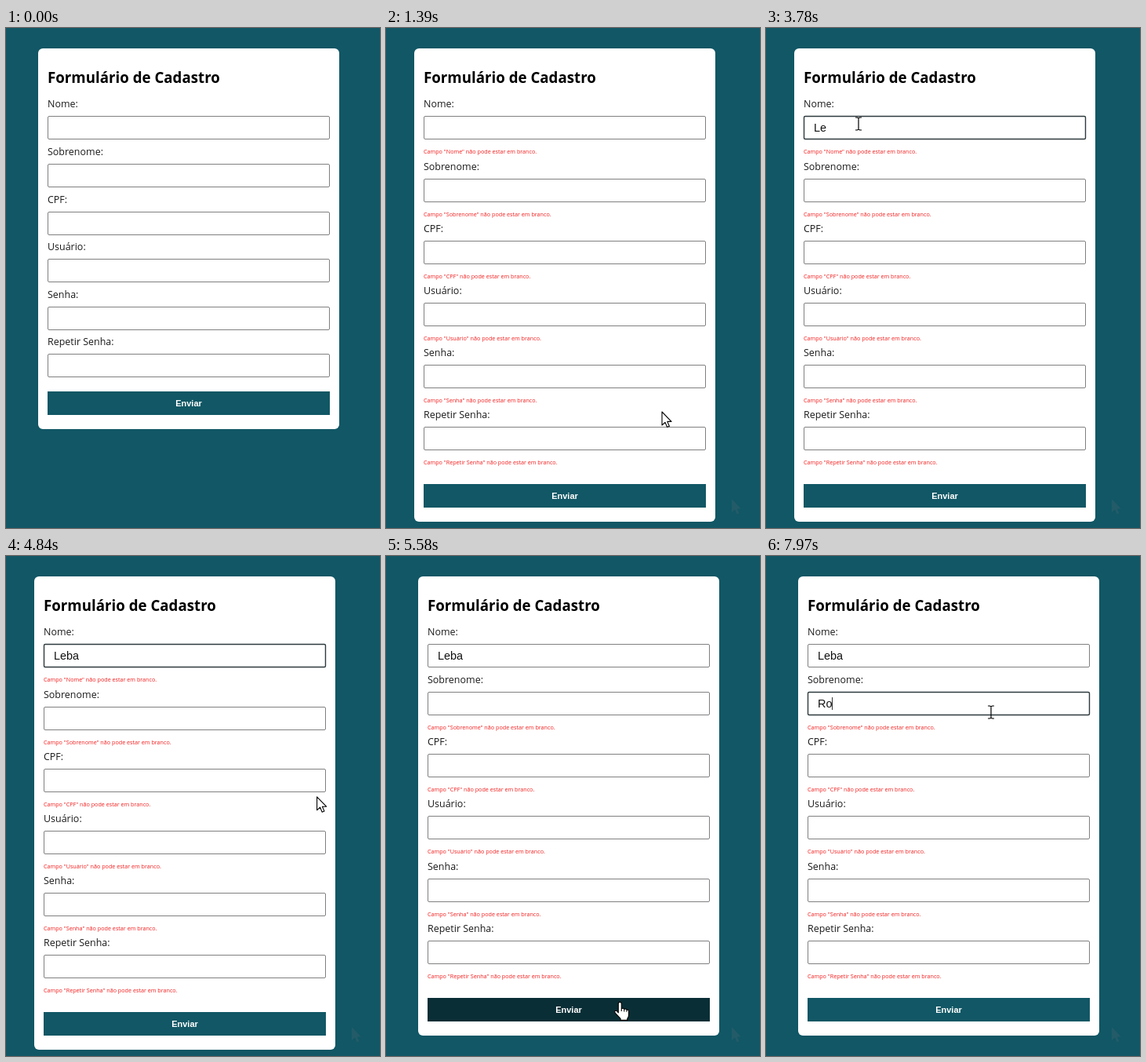
An HTML page for the animation above (8000 ms loop, 477 by 637 pixels).

```html
<!DOCTYPE html>
<html lang="pt-BR">
<head>
<meta charset="utf-8">
<title>Formulário de Cadastro</title>
<style>
  html, body { margin: 0; width: 100%; height: 100%; overflow: hidden; background: #115765; }
  svg { display: block; width: 477px; height: 637px; }
  text { font-family: "Open Sans", "Noto Sans", sans-serif; }
  .title { font-size: 18.72px; font-weight: 700; }
  .label { font-size: 12.48px; fill: #1a1a1a; }
  .error { font-size: 7.2px; fill: #f41c1c; }
  .value { font: 14.4px "Liberation Sans", Arial, sans-serif; fill: #111; }
  .send { font: bold 11px "Liberation Sans", Arial, sans-serif; fill: #fff; text-anchor: middle; }
  .field { fill: #fff; stroke: #808080; }
  .field.focus { stroke: #2e3a3e; stroke-width: 1.4; }
</style>
</head>
<body>
<svg id="stage" viewBox="0 0 477 637"></svg>
<script>
const LOOP = 8000, BLINK = 530;
const TEAL = '#115765', TEAL_DARK = '#0a2e36';
const LABELS = ['Nome', 'Sobrenome', 'CPF', 'Usuário', 'Senha', 'Repetir Senha'];
const ERRORS_AT = 1390, RECHECK_AT = 5440;

// Key times per field: focus first, then one per letter; `blur` ends the focus.
const TYPING = [
  { text: 'Leba', keys: [2120, 2920, 3250, 3910, 4180], blur: 5180 },
  { text: 'Ro', keys: [6780, 7700, 7970], blur: LOOP },
];

// Pointer moves along quadratic curves: from, control, to.
const MOVES = [
  { at: 600, end: 1060, steps: 8, path: [[445, 603], [405, 545], [352, 489]] },
  { at: 1720, end: 2120, steps: 7, path: [[352, 489], [220, 320], [118, 122]] },
  { at: 4580, end: 5180, steps: 10, path: [[118, 122], [680, 400], [297, 590]] },
  { at: 5580, end: 5980, steps: 7, path: [[297, 590], [310, 390], [287, 199]] },
];
const PRESSES = [[1260, 1390], [2120, 2250], [5180, 5310], [6780, 6840]];

const ARROW = 'M0 0V17L4 13.4L6.6 19.5L9.4 18.3L6.8 12.4H12Z';
const HAND = 'M-2 14V2.5a2 2 0 0 1 4 0V9q2-1.5 3.5.5q2-1 3.2.8q2.6-.6 2.6 2v4q0 3-1.8 5.2v2H.8v-2L-5.8 14.5' +
  'q-2-3 .6-3.2q1.6 0 3.2 2.7zM2 9v3M5.5 9.5v3M8.7 10.3v2.5';
const BEAM = 'M-4-8H-1.5L0-7L1.5-8H4M0-7V7M-4 8H-1.5L0 7L1.5 8H4';

const stage = document.getElementById('stage');
const measure = document.createElement('canvas').getContext('2d');
measure.font = '14.4px "Liberation Sans", Arial, sans-serif';

const text = (kind, x, y, content) => `<text class="${kind}" x="${x}" y="${y}">${content}</text>`;
const box = (x, y, w, h, attrs) => `<rect x="${x}" y="${y}" width="${w}" height="${h}" ${attrs}/>`;

function pointerAt(time) {
  const move = MOVES.filter(m => time >= m.at).pop();
  if (!move) return null;
  const step = Math.floor((time - move.at) / (move.end - move.at) * (move.steps - 1) + 1e-6);
  const p = Math.min(1, (step + 1) / move.steps);
  const e = p * p * (3 - 2 * p);
  const [a, b, c] = move.path;
  const [x, y] = [0, 1].map(i => (1 - e) ** 2 * a[i] + 2 * e * (1 - e) * b[i] + e * e * c[i]);
  return { x, y };
}

function layoutAt(time) {
  const hasError = i => time >= ERRORS_AT && (i > 0 || time < RECHECK_AT);
  const rows = [];
  let y = 112.3;
  LABELS.forEach((label, i) => {
    rows.push({ label, y, error: hasError(i) });
    y += hasError(i) ? 79.2 : 60.6;
  });
  const left = time >= ERRORS_AT && time < RECHECK_AT ? 48 : 53;
  return { rows, left, buttonY: Math.round(y - 12.6 + (time >= ERRORS_AT ? 6.3 : 0)) };
}

function typedValue({ text: full, keys, blur }, left, y, time) {
  const past = keys.filter(k => time >= k);
  if (!past.length) return '';
  const value = full.slice(0, past.length - 1);
  const blinkOn = Math.floor((time - past[past.length - 1]) / BLINK) % 2 === 0;
  const caretX = Math.round(left + 13 + measure.measureText(value).width);
  return text('value', left + 13, y + 20, value) +
    (time < blur && blinkOn ? box(caretX, Math.round(y) + 7, 1, 16, 'fill="#333"') : '');
}

function drawRow({ label, y, error }, i, left, time) {
  const typing = TYPING[i];
  const focused = typing && time >= typing.keys[0] && time < typing.blur;
  return text('label', left, y - 11, label + ':') +
    box(left + .5, Math.round(y) + .5, 359, 29, `rx="1.5" class="field${focused ? ' focus' : ''}"`) +
    (typing ? typedValue(typing, left, y, time) : '') +
    (error ? text('error', left, y + 48, `Campo "${label}" não pode estar em branco.`) : '');
}

function drawPointer({ x, y }, overButton, overField, time) {
  const place = `transform="translate(${x.toFixed(1)} ${y.toFixed(1)})"`;
  const shape = overField
    ? `<path ${place} d="${BEAM}" fill="none" stroke="#000" stroke-width="1.2"/>`
    : `<path ${place} d="${overButton ? HAND : ARROW}" fill="#fff" stroke="#000" stroke-width="1.1" stroke-linejoin="round"/>`;
  const pressed = PRESSES.some(([from, to]) => time >= from && time < to);
  return shape + (pressed ? `<circle ${place} r="12" fill="#ff0" opacity=".5"/>` : '');
}

function draw(time) {
  const { rows, left, buttonY } = layoutAt(time);
  const pointer = pointerAt(time);
  const inside = top => pointer && pointer.x >= left && pointer.x <= left + 360 &&
    pointer.y >= top && pointer.y <= top + 30;
  const overButton = inside(buttonY);
  const overField = rows.some(row => inside(row.y));
  return box(0, 0, 477, 637, `fill="${TEAL}"`) +
    (time >= 665 ? `<path d="${ARROW}" transform="translate(441 600)" fill="#245b68"/>` : '') +
    box(left - 12, 26, 384, buttonY + 22, 'rx="6" fill="#fff"') +
    text('title', left, 70, 'Formulário de Cadastro') +
    rows.map((row, i) => drawRow(row, i, left, time)).join('') +
    box(left, buttonY, 360, 30, `fill="${overButton ? TEAL_DARK : TEAL}"`) +
    text('send', left + 180, buttonY + 18.5, 'Enviar') +
    (pointer ? drawPointer(pointer, overButton, overField, time) : '');
}

const start = performance.now();
let shown = '';
function tick() {
  const picture = draw((performance.now() - start) % LOOP);
  if (picture !== shown) stage.innerHTML = shown = picture;
  requestAnimationFrame(tick);
}
tick();
</script>
</body>
</html>
```
